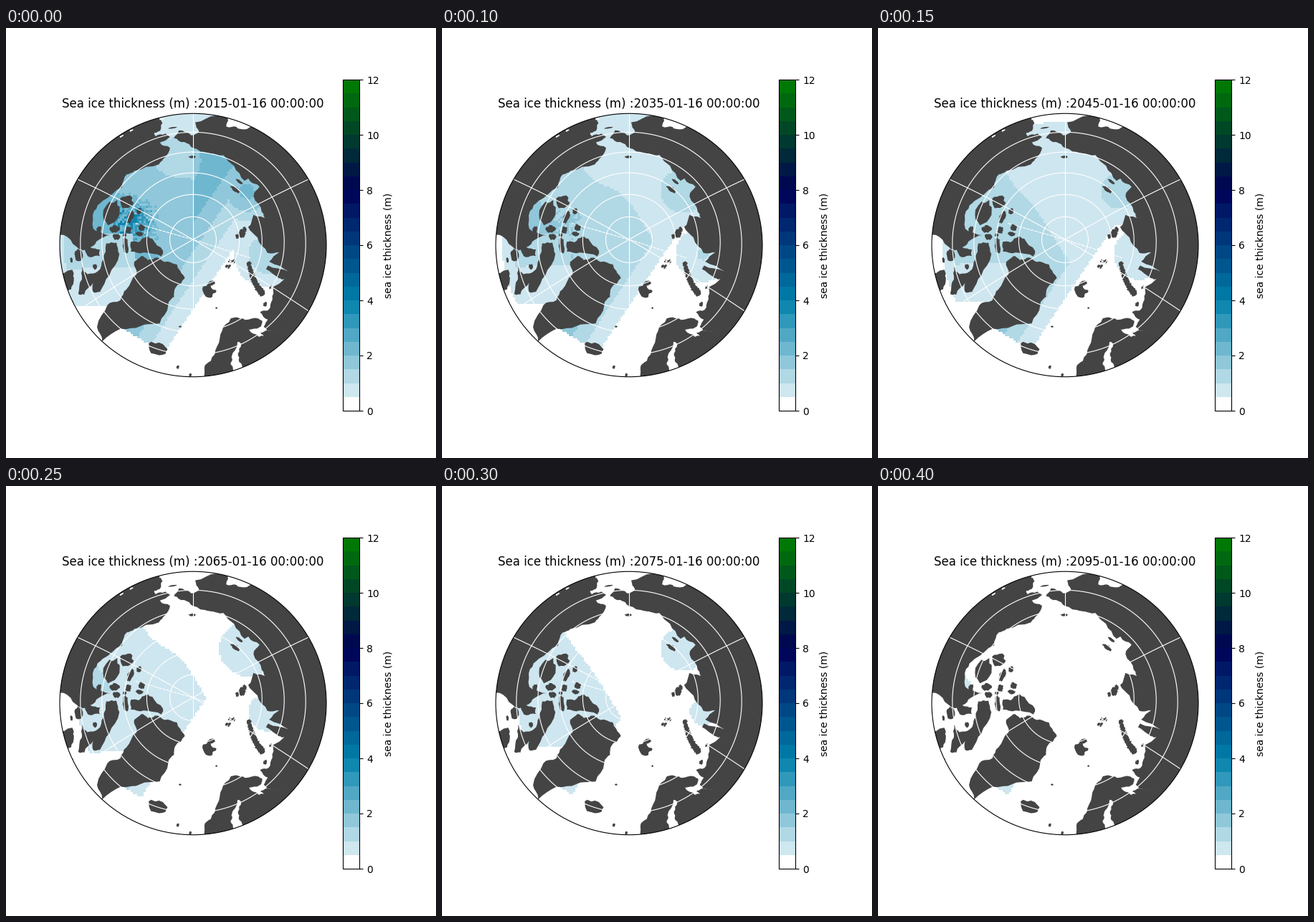
A matplotlib script for the animation above (450 ms loop, 600x600 px).

```python
import numpy as np
import matplotlib.pyplot as plt
from matplotlib.animation import FuncAnimation
from matplotlib.cm import ScalarMappable
from matplotlib.colors import BoundaryNorm, ListedColormap
from matplotlib.patches import Ellipse, Polygon

FRAMES, INTERVAL = 9, 50
LAND = "#444444"
TILT = np.radians(81)          # latitude at the centre of the orthographic view
PIXEL = 1 / 372                # one screen pixel in units of the globe's radius
rng = np.random.default_rng(4)

plt.rcParams["font.family"] = "DejaVu Sans"
fig, ax = plt.subplots(figsize=(6, 6), dpi=100, facecolor="white")

# ocean_r in 24 steps of half a metre, with the thinnest step left white
steps = plt.get_cmap("ocean_r")((np.arange(24) + 0.5) / 24)
steps[0] = 1
cmap = ListedColormap(steps)
norm = BoundaryNorm(np.linspace(0, 12, 25), 24)
bar = fig.colorbar(ScalarMappable(norm, cmap), ax=ax, ticks=range(0, 13, 2))
bar.ax.minorticks_off()
bar.set_label("sea ice thickness (m)")

# the parallel of 60 N bounds the map
MID = np.cos(TILT) * np.sin(np.radians(60))
HALF = 0.5 * np.sin(TILT)
BOX = (-0.5, 0.5, MID - HALF, MID + HALF)
rim = Ellipse((0, MID), 1, 2 * HALF, fc="none", ec="black", lw=0.8, zorder=9, clip_on=False)
ax.add_patch(rim)
ax.axis("off")


def project(lon, lat):
    lon, lat = np.radians(lon), np.radians(lat)
    x = np.cos(lat) * np.sin(lon)
    y = np.cos(TILT) * np.sin(lat) - np.sin(TILT) * np.cos(lat) * np.cos(lon)
    return x, y


def clip(artist):
    artist.set_clip_path(rim)
    return artist


def line(lon, lat, z=6, **style):
    clip(ax.plot(*project(lon, lat), color="white", lw=0.8, zorder=z, **style)[0])


def fill(xy, color):
    clip(ax.add_patch(Polygon(xy, fc=color, ec="none", zorder=4)))


def coast(*pts, color=LAND):
    """Join (lon, lat) points, breaking each edge into four crooked ones."""
    p = np.column_stack(project(*np.array(pts, float).T))
    for _ in range(2):
        q = np.roll(p, -1, 0)
        bend = (q - p)[:, ::-1] * [1, -1] * rng.uniform(-0.2, 0.2, (len(p), 1))
        mid = (p + q) / 2 + np.clip(bend, -PIXEL, PIXEL)
        p = np.stack([p, mid], 1).reshape(-1, 2)
    fill(p, color)


def island(lon, lat, east, north, color=LAND):
    """Ragged oval; half-widths in degrees of arc."""
    t = np.linspace(0, 2 * np.pi, 16, endpoint=False)
    r = rng.uniform(0.8, 1.2, t.size)
    xy = project(lon + r * east * np.cos(t) / np.cos(np.radians(lat)), lat + r * north * np.sin(t))
    fill(np.column_stack(xy), color)


# ---- land: headlands and bays only ----
# Siberia
coast((168, 45), (170, 60), (179, 62.4), (177, 64.7), (-179, 65.8), (-173, 64.3),
      (-169.8, 66.1), (-175, 67.4), (180, 69), (170, 70), (161, 69.5), (152, 70.9),
      (140, 72.5), (139, 71.5), (130, 71), (127, 73.5), (113.5, 73.7), (106.5, 73.1),
      (113.5, 75.7), (104, 77.7), (93, 76), (81, 73.6), (83, 71), (75, 72.8), (73, 68),
      (72, 72.8), (69, 73), (67, 69.5), (68, 68.3), (60.5, 69.8), (54, 68.4), (48, 67.6),
      (43.5, 68.6), (44, 66.2), (40, 65.6), (40, 64.5), (60, 45), (100, 45), (140, 45))
# Scandinavia
coast((40, 64.5), (36.8, 65.1), (37, 63.9), (34.8, 64.5), (32.5, 67), (38, 66.1),
      (41.2, 66.8), (40.5, 67.7), (33.5, 69.3), (28, 71), (25.8, 71.1), (18, 69.3),
      (13, 66.3), (8.5, 63.3), (5.2, 62), (5, 58), (20, 45), (60, 45))
coast((17.3, 59), (17.3, 61.5), (18.5, 63), (24, 65.8), (25.3, 65), (22, 63.3),
      (21.2, 61.5), (23, 59), color="white")
coast((165, 59), (164.5, 62.3), (160, 61.6), (156.5, 61.5), (153, 59), color="white")
# Alaska and Canada
coast((-163, 58), (-166, 61.7), (-164.5, 63.1), (-161, 63.5), (-161, 64.5), (-166, 64.5),
      (-168, 65.6), (-162, 66.3), (-166.5, 68.3), (-162, 70.2), (-156.5, 71.3), (-141, 69.6),
      (-136, 69), (-128, 70.3), (-115, 68), (-108, 67), (-98, 67.8), (-94.5, 72), (-91.5, 69.3),
      (-87.5, 67.3), (-85.5, 69.5), (-81.5, 69.3), (-82, 67), (-86.5, 66), (-87, 64.8),
      (-93.5, 61.8), (-95, 58), (-120, 45), (-160, 45))
# Quebec
coast((-78, 58), (-78, 62.4), (-74, 62.3), (-69.7, 60.8), (-69.5, 59), (-66, 58.8),
      (-64.7, 60.3), (-64.5, 58), (-70, 45))
# Greenland
coast((-73, 78.3), (-66, 79.3), (-65, 80.9), (-52, 82.2), (-33, 83.6), (-22, 82.7),
      (-12, 81.5), (-20, 79), (-18.5, 77), (-21, 75), (-22, 70.5), (-32, 68), (-40, 65),
      (-43, 60), (-49, 61.5), (-53.7, 66.5), (-51, 69.5), (-54, 72), (-59, 75.7), (-70, 76.4))
# Baffin Island
coast((-89, 73.3), (-80, 73.7), (-68, 70.2), (-62, 66.7), (-64, 65.3), (-68, 66.2),
      (-64.8, 63.2), (-66.5, 62), (-72, 64), (-78, 64.8), (-73.5, 65.6), (-73, 68), (-79, 70),
      (-89, 71))
# Ellesmere Island
coast((-89, 76.5), (-80, 76.3), (-76, 79), (-62, 82.3), (-70, 83.1), (-92, 81.2),
      (-95, 80), (-88, 78.2))

# lon, lat, half-width, half-height
for spot in [(-121, 73, 1.4, 1.5), (-110, 71, 2.5, 1.8), (-111, 75.4, 1.5, 0.6),
             (-119, 76.6, 0.7, 0.6), (-99.5, 75.8, 0.8, 0.6), (-99, 72.7, 0.8, 1.1),
             (-93.5, 73.3, 0.7, 0.8), (-97.5, 69.1, 0.8, 0.6), (-104, 78.5, 0.7, 0.7),
             (-97, 78.3, 0.5, 0.8), (-95, 75.1, 0.4, 0.4), (-86, 75.3, 1.8, 0.6),
             (-84.3, 64.4, 1.3, 1), (-82.5, 62.6, 0.6, 0.3), (-76, 67.7, 0.6, 0.5)]:
    island(*spot)
for spot in [(-18.7, 65, 2.1, 1.3), (16.5, 78.4, 1.1, 1.5), (22.5, 79.8, 0.9, 0.5),
             (22.5, 77.9, 0.4, 0.4), (98, 79.3, 0.9, 0.7), (102, 78.6, 0.6, 0.4),
             (95, 80.4, 0.5, 0.4), (141, 75.4, 1.1, 0.5), (142.5, 73.4, 0.8, 0.3),
             (-179.5, 71.2, 0.8, 0.3), (-170.3, 63.4, 0.9, 0.2), (-8.5, 71, 0.3, 0.2),
             (-7, 62, 0.3, 0.4), (-1.2, 60.4, 0.3, 0.4), (19, 74.4, 0.2, 0.2),
             (49, 69, 0.5, 0.4), (59.5, 70.2, 0.4, 0.3)]:
    island(*spot)
for s in np.linspace(0, 1, 12):       # Novaya Zemlya, a bent chain
    island(53 + 4 * s + 10 * s ** 3, 71 + 5.8 * s, 0.8 - 0.2 * s, 0.5)
for _ in range(10):                   # Franz Josef Land
    island(rng.uniform(48, 63), rng.uniform(79.9, 81.3), 0.35, 0.2)
for lon in (-147, -152, -166):        # inlets on the Pacific side
    island(lon, 60.5, 0.5, 0.2, "white")

# ---- graticule ----
ring, ray = np.linspace(-180, 180, 361), np.linspace(60, 90, 40)
for lat in range(65, 90, 5):
    line(ring, lat)
for lon in range(-180, 180, 60):
    line(lon, ray)
for lon in (73, -107):                # seam of the model's grid
    line(lon, np.array([77, 90]), z=3, ls=(0, (4, 1)))

# ---- ice model ----
x, y = np.meshgrid((np.arange(124) + 0.5) / 124 - 0.5,
                   MID + HALF * ((np.arange(123) + 0.5) / 61.5 - 1))
z = np.sqrt(1 - x ** 2 - y ** 2)
lat = np.degrees(np.arcsin(y * np.cos(TILT) + z * np.sin(TILT)))
lon = np.degrees(np.arctan2(x, z * np.cos(TILT) - y * np.sin(TILT)))
# degrees from the pole towards 90 E and towards Greenwich
u = (90 - lat) * np.sin(np.radians(lon))
v = (90 - lat) * np.cos(np.radians(lon))
canada = (v - 1.69 * u) / 1.96        # distance towards the Canadian side
grain = np.random.default_rng(7).random(u.shape)


def bump(u0, v0, width):
    return np.exp(-((u - u0) ** 2 + (v - v0) ** 2) / (2 * width ** 2))


def thickness(t):
    """Ice thickness in metres after t decades."""
    early = np.exp(-3 * t)
    level = 1.5 - 0.185 * t + 0.25 * early
    h = level + 0.03 * np.maximum(canada, -7) - 0.25 * bump(-6, -18, 4)
    h += 0.5 * early * ((u > 0) & (v < 2))
    h += 7 * np.exp(-1.3 * t) * bump(-13, -4, 2.2) * grain ** 2

    # the Atlantic edge draws back towards the pole
    inside = max(2, 15 - 0.085 * t ** 3) - 1.5 * u - v
    h = np.where(inside > 0, np.minimum(h, 0.5 + 0.08 * inside), 0)
    h = np.maximum(h, (level + 0.35) * bump(11.7, -11, 5.5))
    h = np.maximum(h, (0.6 * level + 0.35) * bump(16, 3, 5))

    # Baffin and Hudson Bay
    south = 14 - 0.1 * t ** 2 - v
    bay = np.minimum(0.5 + 0.06 * south, level + 0.25 - 0.2 * np.maximum(66 - lat, 0))
    west = (lon > -96) & (lon < -46) & (lat < 77)
    h = np.where(west, np.where(south > 0, np.minimum(h, bay), 0), h)

    # Bering Sea, and open water south of Denmark Strait
    bering = (np.abs(lon) > 150) & (lat < 66)
    h = np.where(bering, np.minimum(level - 0.4 + 0.05 * (lat - 63), 0.95), h)
    h[(lat < 65.5) & (np.abs(lon) < 46)] = 0
    return np.clip(h, 0, 11.9)


grids = [thickness(i) for i in range(FRAMES)]
ice = clip(ax.imshow(grids[0], cmap=cmap, norm=norm, interpolation="nearest",
                     origin="lower", extent=BOX, aspect="equal", zorder=2))
ax.set(xlim=BOX[:2], ylim=BOX[2:])


def draw(i):
    ice.set_data(grids[i])
    title = ax.set_title(f"Sea ice thickness (m) :{2015 + 10 * i}-01-16 00:00:00")
    return ice, title


anim = FuncAnimation(fig, draw, frames=FRAMES, interval=INTERVAL, repeat=True, repeat_delay=0)
plt.show()
```
